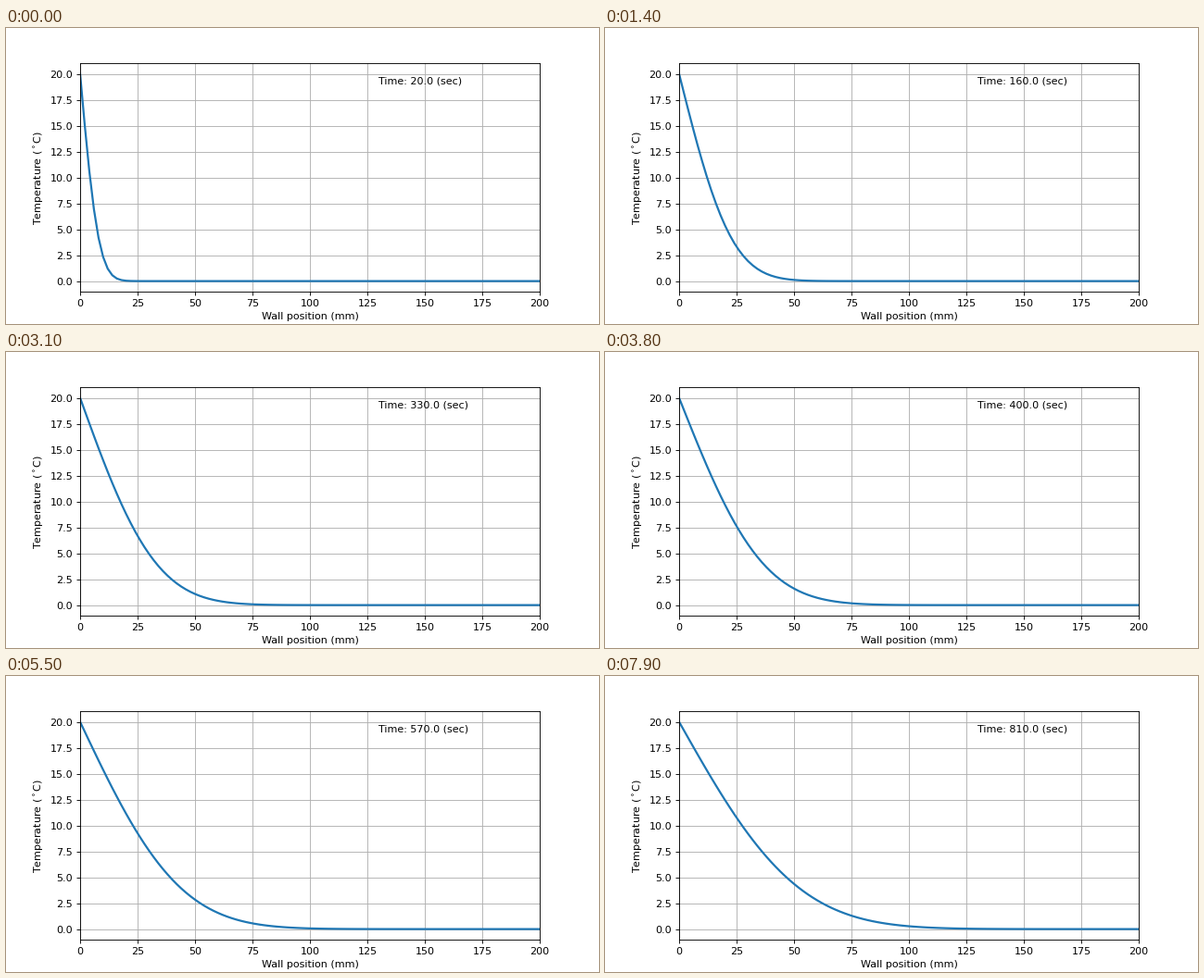
Recreate the animation shown at these times as a matplotlib script. Size 640 by 320 pixels, loop 8000 ms.

```python
import math

import matplotlib.pyplot as plt
import numpy as np
from matplotlib.animation import FuncAnimation

FRAMES = 80
INTERVAL = 100        # ms
T_START, T_STEP = 20.0, 10.0   # s
T_WALL = 20.0         # deg C
DIFFUSIVITY = 1.017   # mm^2/s

erfc = np.vectorize(math.erfc)
x = np.linspace(0, 200, 101)


def temperature(t):
    """Semi-infinite wall with its surface held at T_WALL."""
    return T_WALL * erfc(x / (2 * math.sqrt(DIFFUSIVITY * t)))


plt.rcParams["font.family"] = "DejaVu Sans"
fig, ax = plt.subplots(figsize=(8, 4), dpi=80)
ax.set_xlim(0, 200)
ax.set_ylim(-1, 21)
ax.set_xlabel("Wall position (mm)")
ax.set_ylabel(r"Temperature ($^\circ$C)")
ax.grid()
line, = ax.plot([], [], lw=2)
clock = ax.text(130, 19, "")


def update(i):
    t = T_START + T_STEP * i
    line.set_data(x, temperature(t))
    clock.set_text(f"Time: {t:.1f} (sec)")
    return line, clock


anim = FuncAnimation(fig, update, frames=FRAMES, interval=INTERVAL,
                     repeat=True, repeat_delay=0)
plt.show()
```
